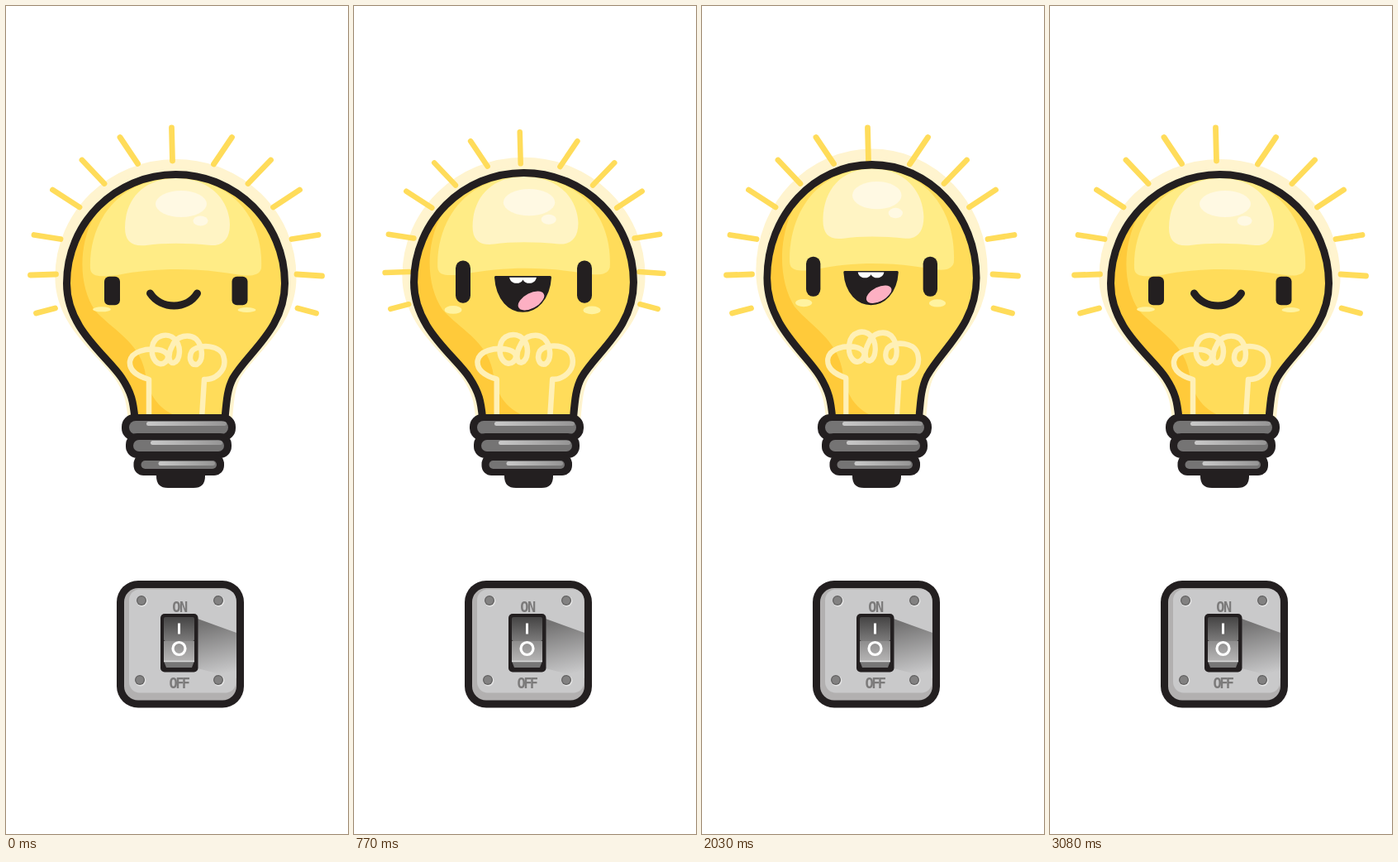
An HTML page for the animation above (3.15 s loop, 414 px wide and 1000 px high).

```html
<!DOCTYPE html>
<html lang="en">
<head>
<meta charset="utf-8">
<title>Happy light bulb</title>
<style>
  html, body { margin: 0; width: 100%; height: 100%; overflow: hidden; background: #fff; }
  svg { display: block; width: 100%; height: 100%; }
  text { font: bold 17px "DejaVu Sans Mono", monospace; fill: #7b7a7a; text-anchor: middle; }
</style>
</head>
<body>
<svg viewBox="0 0 414 1000">
  <defs>
    <path id="glass" d="M156 498C154 478 152 467 140 449C122 422 73.5 390 73.5 335C73.5 262 132.6 203.5 205.5 203.5C278.4 203.5 337.5 262 337.5 335C337.5 390 293 418 275 449C268 462 267 476 265 498"/>
    <clipPath id="inGlass"><use href="#glass"/></clipPath>
    <clipPath id="inMouth"><path class="mouth"/></clipPath>
    <linearGradient id="shadow" gradientUnits="userSpaceOnUse" x1="244" y1="745" x2="258" y2="808">
      <stop stop-color="#747373"/><stop offset="1" stop-color="#c9c9ca"/>
    </linearGradient>
    <linearGradient id="upper" x2="0" y2="1"><stop stop-color="#454444"/><stop offset="1" stop-color="#7c7b7b"/></linearGradient>
    <linearGradient id="lower" x2="0" y2="1"><stop stop-color="#8e8d8d"/><stop offset="1" stop-color="#b5b4b4"/></linearGradient>
    <linearGradient id="shine" x2="1" y2="0"><stop stop-color="#c9c9c9"/><stop offset="1" stop-color="#969595"/></linearGradient>
  </defs>

  <g class="bulb">
    <use href="#glass" transform="translate(206 497) scale(1.07 1.047) translate(-206 -497)" fill="#fff4cf" stroke="#fff4cf" stroke-width="9"/>
  </g>

  <path id="rays" fill="none" stroke="#ffdc5a" stroke-width="6.8" stroke-linecap="round"
    d="M200.5 147L201.5 187M138 158.5L159.5 190.5M273.5 158.5L251.5 191M92 186L119 214.5M320.5 186L293 214.5M56.5 222L89 243M355.5 222L323.5 243M34 276.5L66 281.5M378 276.5L346 281.5M29.5 325L60.5 324M382.5 326L352 324M36.5 371L59.5 365M375.5 371L353 365"/>

  <g class="bulb">
    <use href="#glass" fill="#ffdc5a"/>
    <g clip-path="url(#inGlass)">
      <path fill="#ffca3a" d="M130 225C88 260 82 330 108 368C130 392 160 405 168 440C172 470 185 490 215 498H140L60 400V250Z"/>
      <path fill="#ffec86" d="M102 317C100 262 135 208 206 208C278 208 312 262 309 317C306 328 290 326 278 324C230 316 180 316 135 325C115 327 103 328 102 317Z"/>
      <path fill="#fff4c4" d="M144 268C144 235 165 208 206 208C245 208 270 232 271 264C271 282 262 290 248 289C220 286 190 286 170 289C152 291 144 284 144 268Z"/>
      <g fill="#fff9e3">
        <ellipse cx="212" cy="239" rx="31" ry="16"/>
        <ellipse cx="235.5" cy="259.5" rx="9" ry="6"/>
      </g>
      <path fill="none" stroke="#fff0b6" stroke-width="6.5" stroke-linejoin="round"
        d="M173 498V451C156 446 149 438 150 429C152 417 170 413 184 415C196 417 199 424 193 430C185 437 175 427 177 412C179 397 196 394 204 402C213 411 211 428 203 431C196 432 196 420 201 411C207 397 222 396 230 402C238 410 240 428 231 433C223 434 221 424 225 417C232 408 262 408 264 426C267 441 252 452 240 451L237 498"/>
    </g>
    <use href="#glass" fill="none" stroke="#231f20" stroke-width="9"/>
  </g>

  <g id="face" fill="#231f20">
    <g fill="#fff3a0"><ellipse class="cheek"/><ellipse class="cheek"/></g>
    <rect class="eye"/><rect class="eye"/>
    <path class="mouth" stroke="#231f20" stroke-linejoin="round"/>
    <g clip-path="url(#inMouth)">
      <path fill="#fff" d="M188 328H221C221 338 207 338 204.500 332C202 338 188 338 188 328Z"/>
      <ellipse cx="214.500" cy="355.500" rx="17" ry="8.500" transform="rotate(-25 214.5 355.5)" fill="#fdb0c3"/>
    </g>
  </g>

  <path fill="#231f20" d="M182 558H241V568Q241 582 227 582H196Q182 582 182 568Z"/>
  <g id="cap"></g>

  <g id="switch">
    <rect x="134" y="694" width="154" height="153.500" rx="26" fill="#231f20"/>
    <rect x="143" y="703" width="136" height="135.500" rx="17" fill="#b2b0b0"/>
    <rect x="149" y="704.500" width="129.500" height="125" rx="13" fill="#c9c9ca"/>
    <path fill="url(#shadow)" d="M232 740L279 757V812L232 800Z"/>
    <g id="screws"></g>
    <text x="210" y="731.500" letter-spacing="-1.5">ON</text>
    <text x="209" y="823.500" letter-spacing="-2.5">OFF</text>
    <rect x="187" y="734" width="45.500" height="70.500" rx="5" fill="#231f20"/>
    <rect x="191" y="738" width="37" height="29" rx="2" fill="url(#upper)"/>
    <rect x="191" y="767" width="37" height="24" fill="url(#lower)"/>
    <path fill="#777676" d="M191 791H228L225 799H194Z"/>
    <path stroke="#d9d9d9" stroke-width="1.500" d="M191 791.500H228"/>
    <g fill="none" stroke="#fff">
      <path stroke-width="3" d="M209.500 745.500V758.500"/>
      <circle cx="209.500" cy="776" r="7.500" stroke-width="3.200"/>
    </g>
  </g>
</svg>
<script>
const LOOP = 3150, STEP = 70;
const $ = s => document.querySelector(s);
const $$ = s => [...document.querySelectorAll(s)];
const set = (el, attrs) => { for (const k in attrs) el.setAttribute(k, attrs[k]); };
const mix = (a, b, k) => a + (b - a) * k;

// Cap ribs: x, y, width, height of the dark outline
$('#cap').innerHTML = [[140, 493, 138, 32], [145, 516, 128, 30], [154.5, 541, 109.5, 26]].map(([x, y, w, h]) => {
  const ih = h - 16, iy = y + 8;
  return `<rect x="${x}" y="${y}" width="${w}" height="${h}" rx="${h / 2 - 1}" fill="#231f20"/>
    <rect x="${x + 9}" y="${iy}" width="${w - 18}" height="${ih}" rx="${ih / 2}" fill="#757474"/>
    <rect x="${x + 30}" y="${iy + 1}" width="${w - 41}" height="5" rx="2.5" fill="url(#shine)"/>`;
}).join('');

$('#screws').innerHTML = [[164, 718], [257, 718], [162, 814], [257, 814]].map(([x, y]) =>
  `<circle cx="${x + .8}" cy="${y + .8}" r="6.6" fill="#e4e4e4"/>
   <circle cx="${x}" cy="${y}" r="6" fill="#5f5e5e"/><circle cx="${x}" cy="${y}" r="4.8" fill="#828181"/>`).join('');

// Each track is a list of [time, value], eased with a half cosine
const tracks = {
  rays: [[0, 1], [350, 1.078], [840, .948], [1260, 1]],
  bulbX: [[0, 1], [350, 1.04], [930, 1], [1700, 1], [2030, .96], [2760, 1]],
  bulbY: [[0, 1], [350, 1.04], [930, 1], [1700, 1], [2030, 1.04], [2760, 1]],
  faceX: [[1700, 1], [2170, .954], [2660, 1]],
  faceY: [[0, 1], [350, 1.255], [1050, 1], [1700, 1], [2170, 1.03], [2660, 1]],
  lift: [[1700, 0], [2170, -9.3], [2660, 0]],
  open: [[0, 0], [280, 1], [2560, 1], [3080, 0]]
};

function value(name, t) {
  const keys = tracks[name];
  const i = keys.findIndex(k => k[0] > t);
  if (i === 0) return keys[0][1];
  if (i < 0) return keys[keys.length - 1][1];
  const [t0, a] = keys[i - 1], [t1, b] = keys[i];
  return mix(a, b, (1 - Math.cos(Math.PI * (t - t0) / (t1 - t0))) / 2);
}

const scaleAt = (x, y, sx, sy, dy = 0) =>
  `translate(${x} ${y + dy}) scale(${sx} ${sy}) translate(${-x} ${-y})`;

// Start point, upper lip curve, lower lip curve
const smile = [174.5, 347, 188, 367, 219, 367, 231.5, 347, 219, 367, 188, 367, 174.5, 347];
const laugh = [171.5, 329.5, 194, 329.5, 215, 329.5, 237.5, 329.5, 234, 379, 175, 379, 171.5, 329.5];

const bulbs = $$('.bulb'), mouths = $$('.mouth'), eyes = $$('.eye'), cheeks = $$('.cheek');
const rays = $('#rays'), face = $('#face');

function draw(t) {
  const v = name => value(name, t);
  const open = v('open');
  const m = (a, b) => mix(a, b, open);

  for (const b of bulbs) set(b, { transform: scaleAt(206, 496, v('bulbX'), v('bulbY')) });
  set(rays, { transform: scaleAt(206, 260, v('rays'), v('rays')) });
  set(face, { transform: scaleAt(206, 350, v('faceX'), v('faceY'), v('lift')) });

  const [sx, sy, ...curve] = smile.map((p, i) => m(p, laugh[i]));
  for (const el of mouths) set(el, { d: `M${sx} ${sy}C${curve.join(' ')}Z`, 'stroke-width': m(9, 3) });

  const w = m(19, 18), h = m(34.5, 47);
  [m(128.5, 132), m(283, 279)].forEach((x, i) =>
    set(eyes[i], { x: x - w / 2, y: m(344, 334.5) - h / 2, width: w, height: h, rx: m(6, 8.5) }));
  [[m(116, 120), m(366.3, 365.6)], [m(291.5, 288), m(367, 366)]].forEach(([cx, cy], i) =>
    set(cheeks[i], { cx, cy, rx: m(11, 10.5), ry: m(3, 4.5) }));
}

const start = performance.now();
function tick() {
  const t = (performance.now() - start) % LOOP;
  draw(Math.floor(t / STEP) * STEP);
  requestAnimationFrame(tick);
}
tick();
</script>
</body>
</html>
```
